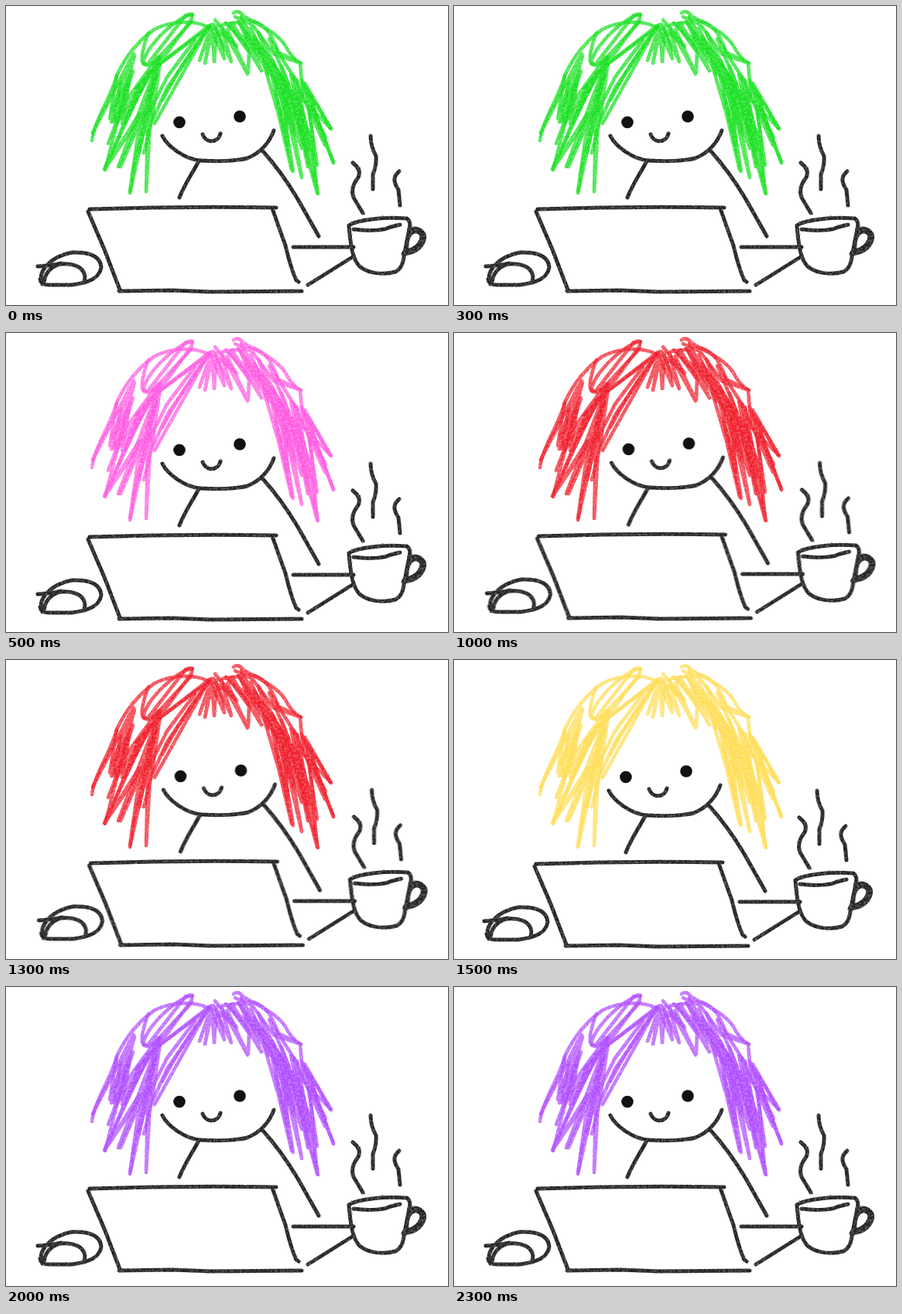
An HTML page for the animation above (2.5 s loop, 571 by 387 pixels).

```html
<!DOCTYPE html>
<html lang="en">
<head>
<meta charset="utf-8">
<title>Hair colours</title>
<style>
  html, body { margin: 0; width: 100%; height: 100%; overflow: hidden; background: #fff; }
  svg { display: block; width: 571px; height: 387px; }
  path { fill: none; stroke-linecap: round; stroke-linejoin: round; }
  .hair { stroke-width: 4.6; stroke-opacity: .76; animation: dye 2.5s step-end infinite; }
  .ink { stroke: #222; stroke-width: 5; animation: jiggle 2.5s step-end infinite; }
  .eye { fill: #111; stroke: none; }
  @keyframes dye {
    0%, 100% { stroke: #12e01a; }
    20% { stroke: #ff55e0; }
    40% { stroke: #f01826; }
    60% { stroke: #ffdc50; }
    80% { stroke: #ae48ff; }
  }
  @keyframes jiggle {
    0%, 100% { transform: translate(0, 0); }
    20% { transform: translate(0, 1px); }
    40% { transform: translate(1.5px, 0); }
    60% { transform: translate(-2px, 1px); }
    80% { transform: translate(0, -2px); }
  }
</style>
</head>
<body>
<svg viewBox="0 0 571 387">
  <defs>
    <!-- slightly rough, soft edge plus faint grain -->
    <filter id="crayon" filterUnits="userSpaceOnUse" x="0" y="0" width="571" height="387" color-interpolation-filters="sRGB">
      <feTurbulence type="fractalNoise" baseFrequency=".35" numOctaves="2" seed="4" result="noise"/>
      <feDisplacementMap in="SourceGraphic" in2="noise" scale="1.5" xChannelSelector="R" yChannelSelector="G"/>
      <feGaussianBlur stdDeviation=".5" result="rough"/>
      <feColorMatrix in="noise" values="0 0 0 0 0  0 0 0 0 0  0 0 0 0 0  0 0 0 .7 .57" result="grain"/>
      <feComposite in="rough" in2="grain" operator="in"/>
    </filter>
  </defs>

  <g filter="url(#crayon)">
    <g class="hair">
      <!-- left crown -->
      <path d="M111 174C114 148 136 118 143 90C156 62 172 44 192 30C216 18 248 18 266 30"/>
      <path d="M184 35C174 60 172 82 184 74L232 12Q244 7 239 18L197 76L263 25L192 152"/>
      <path d="M241 11C218 14 178 56 178 73Q181 82 194 70L240 20"/>
      <path d="M264 27L200 74L168 106M262 27Q236 66 208 106L190 146"/>
      <path d="M244 44L208 92L184 140M256 36Q226 76 202 122"/>
      <!-- left locks -->
      <path d="M165 62L112 164L160 70L137 136L166 64L128 212L177 92L136 150L196 66L149 160"/>
      <path d="M143 90L134 146L164 84L143 152L186 84L127 211L172 140L131 206L180 134L148 208"/>
      <path d="M199 66L145 208L194 90L160 242L186 118L164 215L188 120L181 240L184 110L196 68"/>
      <path d="M148 98L139 150L160 92L150 152L196 72L182 122L198 68L172 190L188 100"/>
      <path d="M200 66L188 150L178 190M154 120L132 178M196 84L170 170L160 240"/>
      <!-- fringe -->
      <path d="M266 24L250 70L268 24L257 74L266 26L269 72L272 26"/>
      <path d="M270 28L291 72L278 26L312 88L286 30L300 64L313 86L314 60L288 24"/>
      <path d="M268 36L282 68L274 32L298 52L270 18"/>
      <!-- right crown -->
      <path d="M294 9Q300 4 307 13C322 23 348 32 360 50Q368 66 380 74"/>
      <path d="M280 24L318 19C338 25 344 40 352 60L381 74L346 62L318 24L296 14"/>
      <path d="M292 22L330 84L304 14L345 92L316 28L352 106L326 34L362 108L336 60L300 36"/>
      <path d="M284 22L318 58L302 22L340 88L320 40L366 104L340 42L377 100"/>
      <path d="M300 20L338 76L322 48L358 116L344 70L372 122L356 78"/>
      <!-- right locks -->
      <path d="M340 74L371 214L350 84L382 222L360 96L386 180L368 88L403 243L376 96L397 208"/>
      <path d="M346 92L372 166L354 88L392 188L372 92L412 180L382 96L423 203L388 106L419 158"/>
      <path d="M380 74L384 122L420 159L386 100L402 206L378 120L390 208L370 110L398 180"/>
      <path d="M348 110L364 180L358 110L382 184L364 102L402 242L392 130L413 170"/>
      <path d="M334 78L352 140L369 212M392 112L406 160L423 202"/>
    </g>
  </g>

  <g class="ink">
    <g filter="url(#crayon)">
      <!-- face and arms -->
      <path d="M202 168C208 181 231 199 252 200C276 202 300 200 312 197C328 190 340 178 346 161"/>
      <path d="M254 166C258 178 274 178 277 165"/>
      <path d="M249 201C241 216 231 230 224 248M331 187C350 208 365 230 377 250L404 298"/>
      <!-- laptop and table -->
      <path d="M108 263Q230 259 349 261M106 266L127 315L147 367M146 369L215 368L265 370L382 369"/>
      <path d="M344 262Q353 288 361 310Q368 340 375 355L378 357"/>
      <path d="M371 312H449M390 361L449 324"/>
      <!-- cup -->
      <path d="M443 284C455 276 490 273 518 275Q524 280 521 288L516 314C513 328 514 338 503 344C490 348 470 347 458 338C448 330 445 310 443 284"/>
      <path d="M449 289C470 292 490 290 497 286L509 283"/>
      <path d="M521 289C534 285 543 294 540 303C536 315 526 320 513 321M518 314C517 303 521 293 528 292C537 291 539 300 534 307C530 313 524 316 514 319"/>
      <!-- steam -->
      <path d="M448 203Q460 212 455 222C447 232 446 240 449 248L461 268"/>
      <path d="M471 168Q471 182 478 194Q479 206 474 218V237M508 214C498 222 502 230 507 238L509 258"/>
      <!-- mouse -->
      <path d="M41 337Q58 336 72 333M47 360C40 345 55 325 85 319C110 318 122 325 123 338C121 352 108 358 85 361H55Q45 361 44 354"/>
      <path d="M49 357C52 340 65 332 80 334Q100 336 102 350L101 358"/>
    </g>
    <circle class="eye" cx="224" cy="150.5" r="7.8"/>
    <circle class="eye" cx="302" cy="143" r="7.8"/>
  </g>
</svg>
</body>
</html>
```
